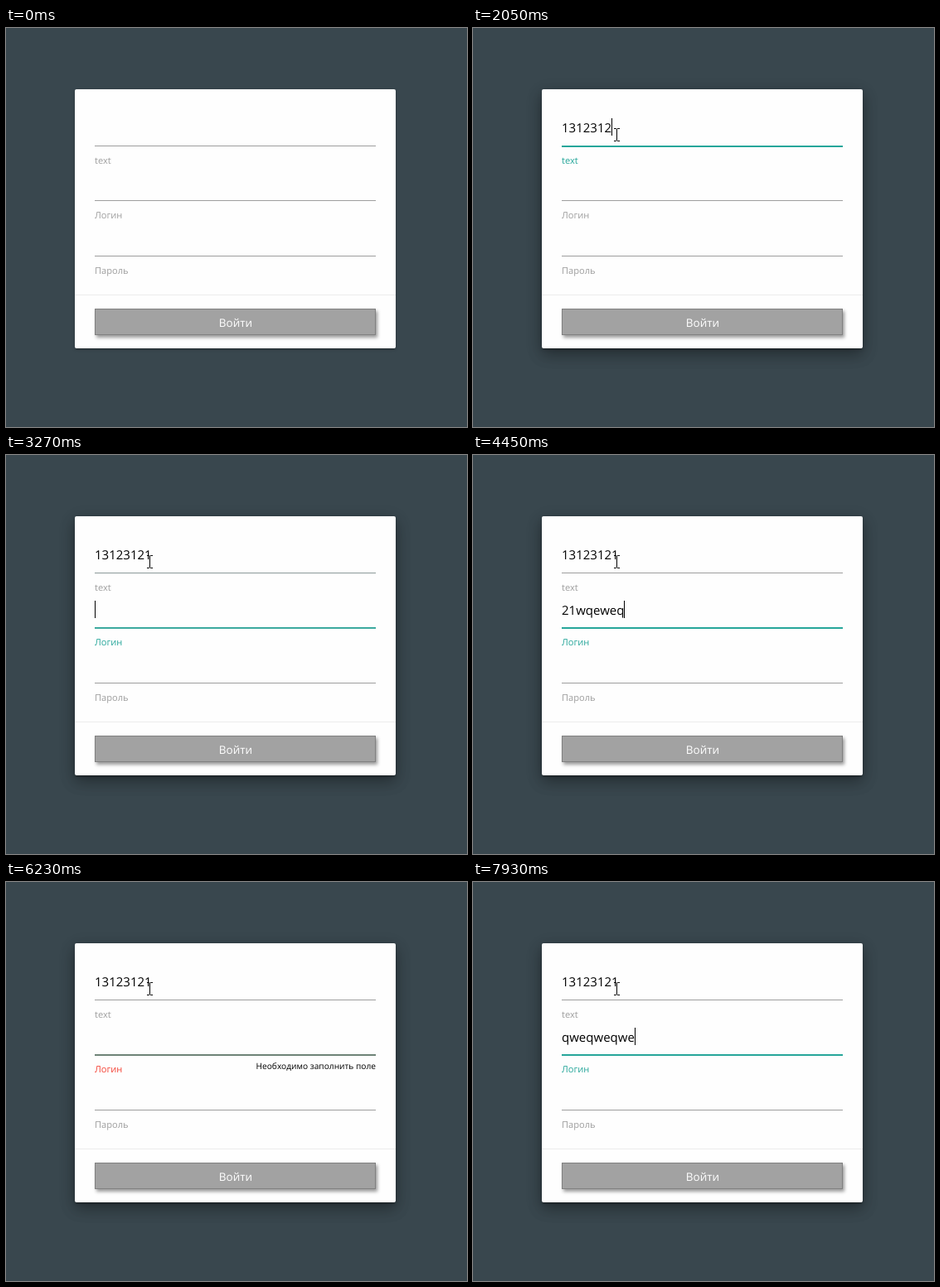
Write an HTML page that moves like this. It is 556x482 px and loops after 8 s.

```html
<!DOCTYPE html>
<html lang="ru">
<head>
<meta charset="utf-8">
<title>Form</title>
<style>
  html, body { margin: 0; width: 100%; height: 100%; overflow: hidden; background: #39474e; }
  div, svg { position: absolute; box-sizing: border-box; }
  .card { left: 83px; top: 74px; width: 387px; height: 313px; border-radius: 2px; }
  .rest { background: #fefefe; box-shadow: 0 2px 2px rgba(0,0,0,.14), 0 1px 5px rgba(0,0,0,.12), 0 3px 1px -2px rgba(0,0,0,.2); }
  #lift { opacity: 0; box-shadow: 0 8px 17px rgba(0,0,0,.2), 0 6px 20px rgba(0,0,0,.19); }
  .rule { left: 83px; top: 322px; width: 387px; height: 1px; background: #ececec; }
  .button { left: 107px; top: 339px; width: 339px; height: 32px; background: #a2a2a2; border: 1px solid #808080; box-shadow: 2px 3px 4px rgba(0,0,0,.4); }
  svg { left: 0; top: 0; }
  text { font: 15px "Open Sans", "Noto Sans", sans-serif; text-rendering: geometricPrecision; white-space: pre; }
  .label { font-size: 11.1px; fill: #9e9e9e; }
</style>
</head>
<body>
<div class="card rest"></div>
<div class="card" id="lift"></div>
<div class="rule"></div>
<div class="button"></div>
<svg width="556" height="482" viewBox="0 0 556 482">
  <g shape-rendering="crispEdges">
    <rect id="line1" x="107" y="142" width="339"/>
    <rect id="glow1" x="107" y="143" width="339" height="1"/>
    <rect id="line2" x="107" y="208" width="339"/>
    <rect id="glow2" x="107" y="209" width="339" height="1"/>
    <rect x="107" y="275" width="339" height="1" fill="#9e9e9e"/>
    <rect id="caret" width="1" height="21"/>
  </g>
  <text id="value1" x="107" y="126"></text>
  <text id="value2" x="107" y="193"></text>
  <text class="label" id="label1" x="107" y="164">text</text>
  <text class="label" id="label2" x="107" y="230">Логин</text>
  <text class="label" x="107" y="297">Пароль</text>
  <text id="error" x="446" y="226" text-anchor="end" style="font-size:10.2px">Необходимо заполнить поле</text>
  <text x="277" y="361" text-anchor="middle" fill="#fff" style="font-size:13.5px">Войти</text>
  <g id="pointer">
    <path id="arrow" d="M.5 .5V16.5L4.2 13L6.8 18.6L9 17.6L6.5 12H11.5Z" fill="#fff" stroke="#000"/>
    <path id="beam" d="M-3 -7.5H0M1 -7.5H4M-3 7.5H0M1 7.5H4M.5 -7V7" stroke="#000" shape-rendering="crispEdges"/>
    <circle id="ring" cx="-.5" cy=".5" r="10" fill="none" stroke="#000"/>
  </g>
</svg>
<script>
const LOOP = 8000, FADE = 200;
const GREY = [158, 158, 158], TEAL = [38, 166, 154], RED = [244, 67, 54];
const CLICK = 1130, TAB = 3090, EMPTY = 6160, REFILL = 7040;

// Each key is pressed at the matching time; "<" is backspace.
const typed1 = { keys: "13123121", times: [1470, 1700, 1770, 1840, 1910, 1980, 2050, 2410] };
const typed2 = {
  keys: "21wqeweq<<<<<<<<qweqweqwe",
  times: [3560, 3650, 4110, 4150, 4200, 4370, 4410, 4450,
          4930, 5060, 5200, 5330, 5470, 5590, 5920, EMPTY,
          REFILL, 7180, 7340, 7580, 7650, 7720, 7790, 7860, 7930]
};

const el = id => document.getElementById(id);
const within = (t, a, b) => t >= a && t < b;
const ramp = (t, start, length = FADE) => Math.min(1, Math.max(0, (t - start) / length));
const mix = (a, b, k) => a.map((v, i) => v + (b[i] - v) * k);
const rgb = c => `rgb(${c.map(Math.round)})`;
const show = (id, on) => el(id).style.display = on ? "" : "none";

function valueAt({ keys, times }, t) {
  let s = "";
  times.forEach((time, i) => {
    if (time <= t) s = keys[i] === "<" ? s.slice(0, -1) : s + keys[i];
  });
  return s;
}

function drawLine(n, color, glow) {
  el("line" + n).setAttribute("height", 1);
  el("line" + n).style.fill = el("glow" + n).style.fill = rgb(color);
  el("glow" + n).style.opacity = glow;
}

function drawFields(t) {
  el("value1").textContent = valueAt(typed1, t);
  el("value2").textContent = valueAt(typed2, t);

  const focus1 = ramp(t, CLICK + 30) - ramp(t, TAB), focus2 = ramp(t, TAB);
  const bad = ramp(t, EMPTY) - ramp(t, REFILL), invalid = within(t, EMPTY, REFILL);
  drawLine(1, mix(GREY, TEAL, focus1), focus1);
  drawLine(2, mix(mix(GREY, TEAL, focus2), RED, bad), focus2);
  el("label1").style.fill = rgb(within(t, CLICK, TAB) ? TEAL : GREY);
  el("label2").style.fill = rgb(invalid ? RED : t >= TAB ? TEAL : GREY);
  show("error", invalid);

  const field = t < TAB ? 1 : 2;
  const width = el("value" + field).getComputedTextLength();
  el("caret").setAttribute("x", Math.round(107 + width));
  el("caret").setAttribute("y", field === 1 ? 109 : 176);
  show("caret", within(t, CLICK, 2940) || within(t, TAB, 6020) || t >= 6490);
}

function drawPointer(t) {
  const u = 1 - (1 - ramp(t, 320, 780)) ** 2;
  const x = Math.round(315 - 142 * u), y = Math.round(458 - 329 * u);
  const overInput = [142, 208, 275].some(base => within(y, base - 45, base + 1));
  el("pointer").setAttribute("transform", `translate(${x} ${y})`);
  show("pointer", t >= 320);
  show("arrow", !overInput);
  show("beam", overInput);
  show("ring", within(t, CLICK, 1300));
  el("lift").style.opacity = ramp(t, 410, 250);
}

let start;
function frame(now) {
  start ??= now;
  const t = (now - start) % LOOP;
  drawFields(t);
  drawPointer(t);
  requestAnimationFrame(frame);
}
requestAnimationFrame(frame);
</script>
</body>
</html>
```
